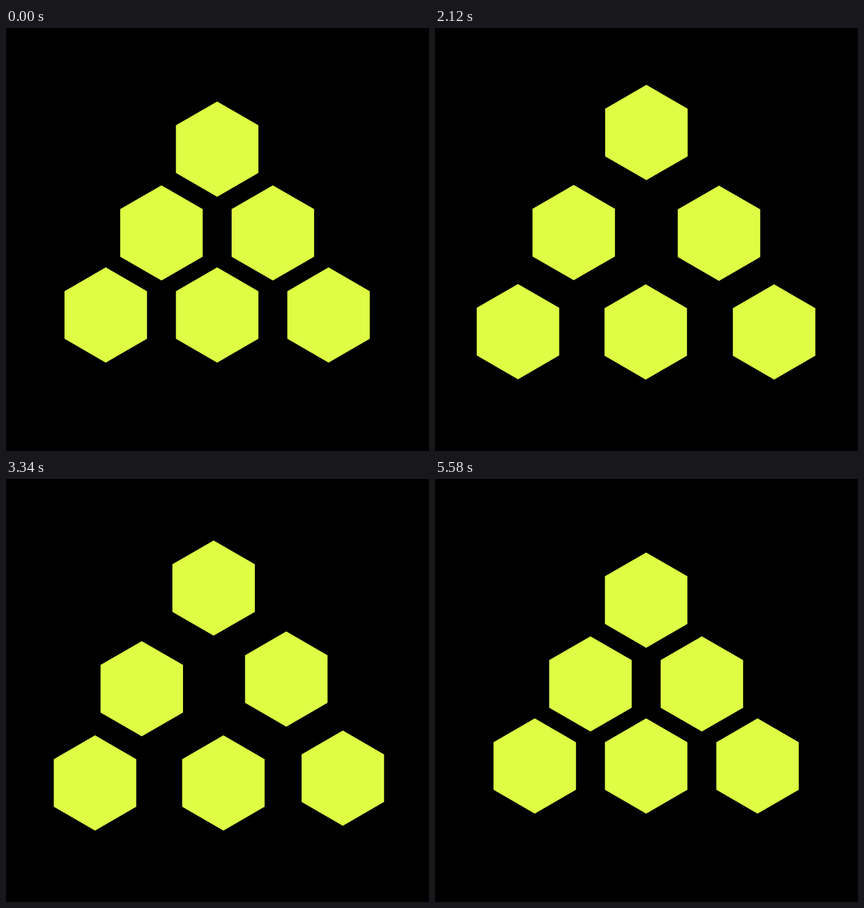
An HTML page with a canvas that plays this animation: 748 px wide and 748 px high, repeating every 5.6 s.

```html
<!DOCTYPE html>
<html lang="en">
<head>
<meta charset="utf-8">
<title>Hexagon triangle</title>
<style>
  html, body { margin: 0; width: 100%; height: 100%; overflow: hidden; background: #000; }
  canvas { display: block; width: 100%; height: 100%; }
</style>
</head>
<body>
<canvas id="stage" width="748" height="748"></canvas>
<script>
const ctx = document.getElementById('stage').getContext('2d');
const LOOP = 5600, RADIUS = 84.2, SPREAD = 30;
const CENTER_X = 373.4, CENTER_Y = 400, COLUMN = 98.5, ROWS = [214.2, 362.4, 507.5];

// Rows of one, two and three slots, each with its outward direction.
const slots = [];
ROWS.forEach((y, row) => {
  for (let col = -row; col <= row; col += 2) {
    slots.push({ x: CENTER_X + COLUMN * col, y, dx: Math.sign(col), dy: row - 1 });
  }
});

// Clockwise order, so that each hexagon moves on to the next slot.
const angle = s => Math.atan2(s.y - CENTER_Y, s.x - CENTER_X);
slots.sort((a, b) => angle(a) - angle(b));

// Each 140 ms holds three steps, lasting 20, 100 and 20 ms.
function stepAt(ms) {
  const rest = ms % 140;
  return 3 * Math.floor(ms / 140) + (rest < 20 ? 0 : rest < 120 ? 1 : 2);
}

function ease(step, from, to) {
  const s = Math.min(1, Math.max(0, (step - from) / (to - from)));
  return s * s * (3 - 2 * s);
}

function hexagon(x, y) {
  ctx.beginPath();
  for (let k = 0; k < 6; k++) {
    const a = k * Math.PI / 3;
    ctx.lineTo(x + RADIUS * Math.sin(a), y - RADIUS * Math.cos(a));
  }
  ctx.fill();
}

function draw(ms) {
  const step = stepAt(ms % LOOP);
  const gap = SPREAD * (ease(step, 0, 30) - ease(step, 81, 106));
  const turn = ease(step, 45, 75);
  const points = slots.map(s => [s.x + s.dx * gap, s.y + s.dy * gap]);

  ctx.fillStyle = '#000';
  ctx.fillRect(0, 0, 748, 748);
  ctx.fillStyle = '#defd44';
  points.forEach(([x, y], i) => {
    const [nextX, nextY] = points[(i + 1) % points.length];
    hexagon(x + (nextX - x) * turn, y + (nextY - y) * turn);
  });
}

const start = performance.now();
function tick() {
  draw(performance.now() - start);
  requestAnimationFrame(tick);
}
tick();
</script>
</body>
</html>
```
